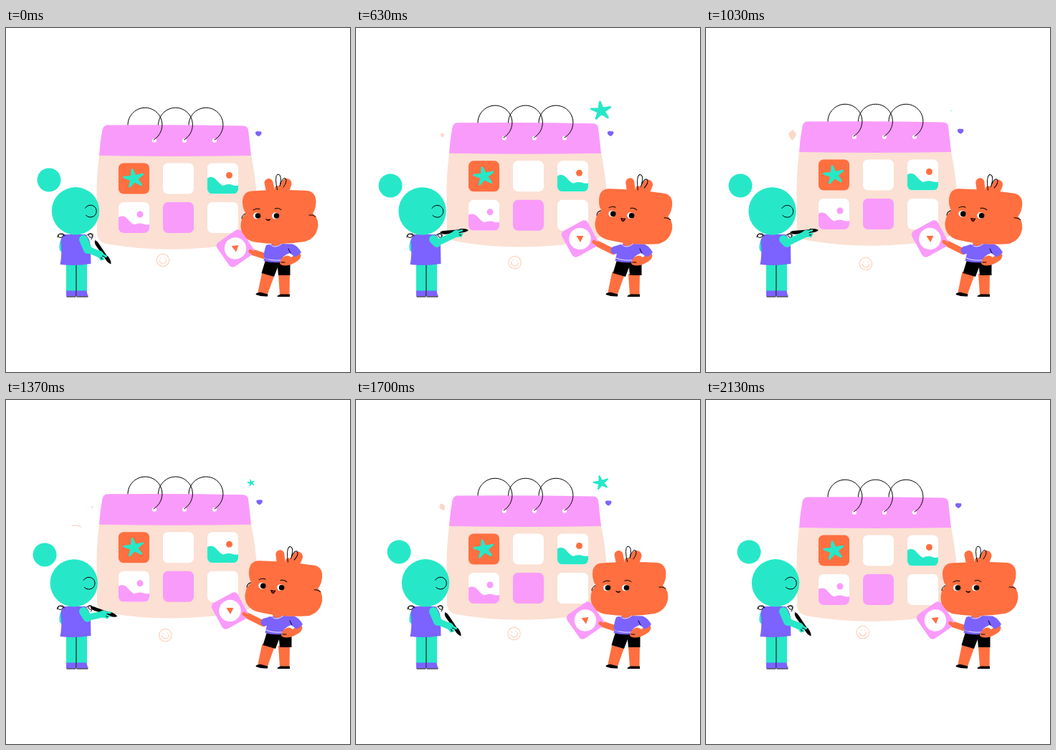
An HTML page for the animation above (2170 ms loop, 480 px wide and 480 px high).

```html
<!DOCTYPE html>
<html lang="en">
<head>
<meta charset="utf-8">
<title>Planning calendar</title>
<style>
  html, body { margin: 0; width: 100%; height: 100%; overflow: hidden; background: #fff; }
  svg { display: block; width: 100vw; height: 100vh; }
  .green { fill: #26e8c8; }
  .violet { fill: #7c62ff; }
  .orange { fill: #ff6f40; }
  .pink { fill: #f99bfb; }
  .peach { fill: #fbe0d3; }
  .white { fill: #fff; }
  .line { fill: none; stroke: #000; stroke-width: 1; stroke-linecap: round; stroke-linejoin: round; }
  .limb { fill: none; stroke-linecap: round; stroke-linejoin: round; }
  .g { stroke: #26e8c8; }
  .o { stroke: #ff6f40; }
  .v { stroke: #7c62ff; }
</style>
</head>
<body>
<svg viewBox="0 0 480 480">
  <defs>
    <path id="star" class="green g" stroke-width="3" stroke-linejoin="round"/>
    <clipPath id="cell"><rect width="43" height="43" rx="7"/></clipPath>
    <path id="hills" clip-path="url(#cell)" d="M0 21Q7 17 13 24Q18 30 22 31.500Q29 28 36 31Q40 32 43 31V43H0Z"/>
    <path id="ring" class="line" d="M-24 1A24 24 0 1 1 12 22"/>
  </defs>

  <g id="calendar">
    <path class="peach" d="M130 177Q126 210 126.500 240L127 286Q127 298 140 301Q190 310 245 308.500Q295 307 330 299Q352 295 352 270Q351 222 342 177Z"/>
    <path class="pink" d="M141 135.500Q236 134.500 331 136.500Q337 137 338 142L342 178Q236 180 130 178Q131 160 134.500 142Q136 136 141 135.500Z"/>
    <g class="white">
      <circle cx="207" cy="157" r="3"/><circle cx="249" cy="157" r="3"/><circle cx="291" cy="157" r="3"/>
    </g>
    <use href="#ring" x="194" y="134"/><use href="#ring" x="236.500" y="134"/><use href="#ring" x="279" y="134"/>
    <g transform="translate(157 188.500)">
      <rect class="orange" width="43" height="43" rx="7"/>
      <use href="#star" transform="translate(21.500 21.500)"/>
    </g>
    <rect class="white" x="219" y="188.500" width="43" height="43" rx="7"/>
    <g transform="translate(281 188.500)">
      <rect class="white" width="43" height="43" rx="7"/>
      <use href="#hills" class="green"/><circle class="orange" cx="30.500" cy="17" r="4.500"/>
    </g>
    <g transform="translate(157 243)">
      <rect class="white" width="43" height="43" rx="7"/>
      <use href="#hills" class="pink"/><circle class="pink" cx="30" cy="17" r="4.500"/>
    </g>
    <rect class="pink" x="219" y="243" width="43" height="43" rx="7"/>
    <rect class="white" x="281" y="243" width="43" height="43" rx="7"/>
  </g>

  <g id="smiley" fill="none" stroke="#ffc9b0" stroke-width="1" stroke-linecap="round">
    <circle r="8.700"/><path d="M-5 0Q-4 5 0 5Q4 5 5 0M-3 -3v1M3 -3v1"/>
  </g>
  <path id="arc" pathLength="1" d="M89 177Q97 172.500 105 177.500" fill="none" stroke="#fbc0bd"/>
  <path id="kite" fill="#fbd8c8" d="M.5 -7.500Q4 -5 5.500 -.5Q3.500 4 0 7.500Q-4 4 -5.500 -1Q-4 -5 .5 -7.500Z"/>
  <path id="blob" class="violet" d="M-4 -2.200Q-1 -4 1 -3Q4 -4 4.500 -1.500Q4 2 .5 3.800Q-5 2 -4 -2.200Z"/>
  <use id="spark" href="#star"/>

  <g id="painter">
    <path class="green" d="M84 328H113V367H84Z"/>
    <path class="violet" d="M84 366.500H98V374.500H84ZM98.500 366.500H112.500Q113 371 115 374.500H98.500Z"/>
    <path class="line" d="M98 330V374M85 375H97M99 375H114"/>
    <path class="limb g" stroke-width="9" d="M83 293Q78 300 79 308"/>
    <path class="violet" d="M81 288H111Q117 294 118 304L118.500 329Q97 332.500 75.500 330Q78 318 77 304Q75 293 81 288Z"/>
    <g id="bows">
      <path class="line" d="M82 290Q74 285 73 289Q73 294 78 292Q83 288 79 287Q71 287 72 292"/>
      <path class="line" d="M113 289Q118 285 121 288Q122 293 117 292Q113 288 118 287Q123 290 119 295"/>
    </g>
    <path id="pencil" d="M-20 -1Q-17 -3 -12 -2.500L7 -2L9 -3Q17 -3 20 0Q17 3 9 2.500L7 2L-12 2.500Q-18 2.500 -20 -1Z"/>
    <path id="upper" class="limb g" stroke-width="12"/>
    <path id="fore" class="limb g" stroke-width="9"/>
    <g id="hand">
      <ellipse class="green" rx="6" ry="5"/>
      <path class="limb g" stroke-width="3" d="M2 -2L8 -4M3 1L8 1M2 3L6 4"/>
      <path class="line" stroke-width=".6" d="M4 -1L7 -2M4 2L7 2.500"/>
    </g>
    <circle id="bun" class="green" r="16.500"/>
    <g id="face">
      <circle class="green" r="33.200"/>
      <path class="line" d="M13.500 -4A8.500 8.500 0 1 1 14.500 6"/>
    </g>
  </g>

  <g id="friend">
    <path class="orange" d="M357.500 340L374.500 345L365 371.500L351.500 368.500ZM380 343H396L395.500 372H382Z"/>
    <path d="M349 370.500Q353 367.500 358 369.500L365.500 371.500L365 374.500Q356 375 348.500 372ZM378.500 374Q382 370.500 387 371.500H396V375H379Z"/>
    <path id="reach" class="limb o" stroke-width="8.500"/>
    <g id="torso">
      <path d="M362 324L396.500 328V345H380L379 334L374 347L356.500 342Z"/>
      <path class="orange" d="M402 317L411 315Q414 322 402 328Q391 334 383 330Q380 325 386 320Q393 315 398 320Z"/>
      <path class="violet" d="M363 303Q372 300 400 301.500Q408 305 412 313Q408 318 403 319.500L396 314Q384 318 382.500 327Q370 328 359.500 325Q363 314 363 303Z"/>
      <path class="limb" stroke="#fff" stroke-width=".9" d="M361 321Q370 325 383 324M368 302Q375 309 385 301"/>
      <path class="orange" d="M369 298H384Q382 304 377 304Q371 304 369 298Z"/>
      <path class="line" stroke-width=".6" d="M397 314L394 308M384 327L389 327"/>
    </g>
    <path id="sleeve" class="limb v" stroke-width="11"/>
    <g id="head">
      <g id="tufts">
        <path class="limb o" stroke-width="12" d="M366.500 216L370 232"/>
        <path class="limb o" stroke-width="14" d="M391.500 217L386 233"/>
        <path class="limb o" stroke-width="8" d="M379 224V232"/>
        <path class="line" d="M379 228Q374 207 379 204Q386 204 382 221Q386 207 390 210Q393 214 387 222"/>
      </g>
      <path class="orange" d="M330 243Q330 228.500 343 227.500Q381 225 420 227Q432.500 228.500 432.500 243Q432.500 256 424 263H339Q330 256 330 243Z"/>
      <path class="orange" d="M339 256H424Q435.500 262 435.500 275Q434 293 417 298Q381 304 346 298.500Q328.500 294 327.500 277Q327.500 262 339 256Z"/>
      <path class="line" d="M329 266Q329 261 334 259M423 261Q428 260 432 263"/>
      <g id="open">
        <ellipse class="white" cx="350" cy="262" rx="5" ry="4.500"/><ellipse class="white" cx="376" cy="262" rx="5" ry="4.500"/>
        <circle cx="351.500" cy="262" r="3.800"/><circle cx="377.500" cy="262" r="3.800"/>
        <path class="line" d="M345 254Q349 251 354 252.500M375 252Q380 250 384 253.500"/>
      </g>
      <path id="shut" class="line" d="M350.500 259Q356 252 361 258M377 258Q382 252 387 259"/>
      <path id="mouth" class="line" style="fill:#c8202a"/>
    </g>
    <g id="card">
      <rect class="pink" x="-20.500" y="-20.500" width="41" height="41" rx="6"/>
      <circle class="white" r="15.200"/>
      <path class="orange" transform="rotate(28)" d="M-5 -4H5L.5 5Z"/>
    </g>
    <path id="grip" class="limb o" stroke-width="5"/>
  </g>
</svg>
<script>
const LOOP = 2170;
const $ = id => document.getElementById(id);
const set = (id, name, value) => $(id).setAttribute(name, value);
const place = (id, [x, y], turn = 0, scale = 1) =>
  set(id, 'transform', `translate(${x} ${y}) rotate(${turn}) scale(${scale})`);
const line = (id, a, b) => set(id, 'd', `M${a}L${b}`);

const mix = (a, b, k) => a + (b - a) * k;
const between = (a, b, k) => a.map((v, i) => mix(v, b[i], k));
const ramp = (t, from, to) => Math.min(1, Math.max(0, (t - from) / (to - from)));
const ease = (t, from, to) => {
  const u = ramp(t, from, to);
  return u * u * (3 - 2 * u);
};
// Goes past the end, then settles.
const overshoot = (t, from, to) => {
  const v = ease(t, from, to) - 1;
  return 1 + 3.6 * v ** 3 + 2.6 * v * v;
};
// Pulls back before it goes.
const windUp = (t, from, to) => {
  const u = ramp(t, from, to);
  return 4 * u ** 3 - 3 * u * u;
};

function starPath(outer, inner) {
  const points = Array.from({ length: 10 }, (_, i) => {
    const r = i % 2 ? inner : outer, a = i * Math.PI / 5 - 1.75;
    return `${(r * Math.cos(a)).toFixed(2)} ${(.9 * r * Math.sin(a)).toFixed(2)}`;
  });
  return `M${points.join('L')}Z`;
}
set('star', 'd', starPath(13.8, 4.2));

function drawPainter(t) {
  const lean = overshoot(t, 60, 600) - overshoot(t, 1270, 1770);
  const lift = ease(t, 80, 560) - ease(t, 1180, 1620);
  const elbow = between([114, 309], [113, 300], lift);
  const hand = between([131, 316], [140, 287], lift);
  const turn = mix(55, -6, lift);
  place('bun', between([60, 212], [48, 220], lean));
  place('face', between([97, 255.3], [92.5, 255.5], lean));
  place('bows', [-lean, 0]);
  place('pencil', between([135, 313], [137, 284], lift), turn);
  place('hand', hand, turn * .8);
  line('upper', [108, 295], elbow);
  line('fore', elbow, hand);
}

function drawFriend(t) {
  const back = ease(t, 1430, 1690);
  const perk = ease(t, 80, 460) - back;
  const tilt = ease(t, 280, 540) - back;
  const show = windUp(t, 150, 610) - back;
  const grip = between([343, 312.5], [334, 299.5], show);
  const shoulder = between([363, 319], [359, 312], show);
  const shut = t > 220 && t < 500;
  set('head', 'transform', `translate(${5.5 * tilt} 0) rotate(${5.2 * tilt} 381 280)`);
  place('tufts', [4.5 * perk, 0]);
  place('torso', [2 * tilt, 0]);
  place('card', between([320, 307.5], [312.5, 294], show), mix(-35, -28.5, show));
  set('open', 'visibility', shut ? 'hidden' : 'visible');
  set('shut', 'visibility', shut ? 'visible' : 'hidden');
  set('mouth', 'd', `M363 267Q366 ${269 - perk} 369 267Q366 ${270 + 5 * perk} 363 267`);
  line('reach', grip, shoulder);
  line('sleeve', [367 + 2 * tilt, 308], [shoulder[0] + 2, shoulder[1] - 2]);
  line('grip', [grip[0] - 2, grip[1] - 1], [grip[0] + 3, grip[1] + 2]);
}

function drawRest(t) {
  const a = t / LOOP * 2 * Math.PI, c = Math.cos(a);
  place('calendar', [0, -2.5 * (1 - c)]);
  place('smiley', [221 - 2 * c, 326.5 - 2.5 * c], 10 * Math.sin(a));
  place('blob', [353.5 + 1.8 * Math.cos(a - 2.4), 145.5 + 3 * Math.cos(a - .87)]);

  const spark = ease(t, 80, 420) - ease(t, 800, 1070) + .75 * (ease(t, 1200, 1550) - ease(t, 1720, 2030));
  const kite = ease(t, 300, 1000) - ease(t, 1100, 1500) + .75 * (ease(t, 1420, 1720) - ease(t, 1780, 2100));
  place('spark', [342, 115.5], 4 * Math.sin(a), spark);
  place('kite', [120.5, 149.5], -30 * ease(t, 1400, 1550), kite);

  const beat = t % 1000, tail = ease(beat, 320, 500), head = ease(beat, 180, 350);
  set('arc', 'stroke-dasharray', `0 ${tail} ${head - tail} 2`);
}

function frame() {
  const t = performance.now() % LOOP;
  drawRest(t);
  drawPainter(t);
  drawFriend(t);
  requestAnimationFrame(frame);
}
frame();
</script>
</body>
</html>
```
